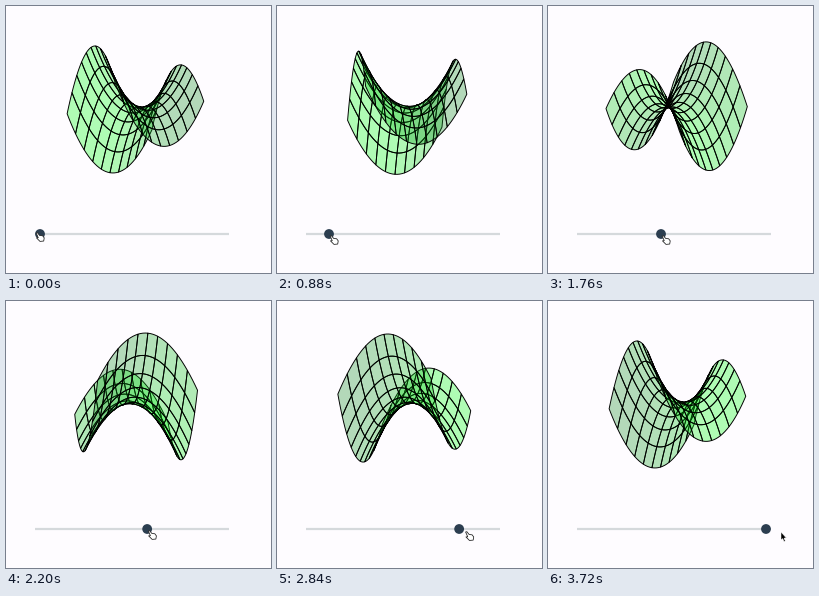
A matplotlib script that plays this animation: 265x267 px, repeating every 3760 ms.

```python
import numpy as np
import matplotlib.pyplot as plt
from matplotlib.animation import FuncAnimation
from matplotlib.collections import PolyCollection
from matplotlib.patches import Circle, Polygon

W, H, DPI = 265, 267, 100
FRAMES, STEP = 94, 40
PX = 72 / DPI

# Saddle z = K (x^2 - y^2) on [-1, 1]^2, seen from slightly below
CX, CY, SCALE = 128.5, 101.6, 50
ELEV = np.radians(20)
K = 1.095
CELLS = 10
PERSPECTIVE = 0.04
START_DEG, SWEEP_DEG = 30, 180

# The knob is dragged from X0 to X1; the hand drifts ahead of it
X0, X1, TRACK_Y = 34, 218, 228
DRAG = {600: X0, 880: 52, 1760: 113, 3400: X1}
RELEASE = 3520

HAND = 0.88 * np.array([(-4.4, -4.6), (-3, -5), (-0.4, -1.8), (3, -1.4),
                        (4.8, 1), (4.2, 4.6), (0, 5), (-4, 1), (-2, 0.8)])
ARROW = np.array([(0, -5), (0, 3), (1.7, 1.6), (3, 4.6), (4.3, 4),
                  (3, 1.1), (5.4, 1)])


def cell_borders():
    """Outlines of all grid cells, each side sampled so that it bends."""
    s = np.linspace(0, 1, 5)[:-1]
    zero, one = np.zeros(4), np.ones(4)
    u = np.concatenate([s, one, 1 - s, zero])
    v = np.concatenate([zero, s, one, 1 - s])
    i, j = np.divmod(np.arange(CELLS ** 2), CELLS)
    return 2 * (i[:, None] + u) / CELLS - 1, 2 * (j[:, None] + v) / CELLS - 1


def shade(x, y):
    """Translucent green, lit from a direction fixed to the surface."""
    x, y = x.mean(axis=1), y.mean(axis=1)
    n = np.stack([-2 * K * x, 2 * K * y, np.ones_like(x)], axis=1)
    n /= np.linalg.norm(n, axis=1, keepdims=True)
    light = n @ np.array([2, 2, 1]) / 3
    t = np.clip((light + 0.85) / 1.75, 0, 1)[:, None]
    dark = np.array([0.05, 0.52, 0.12, 0.31])
    bright = np.array([0, 1, 0.05, 0.31])
    return dark + (bright - dark) * t


GX, GY = cell_borders()
GZ = K * (GX ** 2 - GY ** 2)
COLORS = shade(GX, GY)


def project(angle):
    """Screen outlines of the cells and their order from far to near."""
    right = GX * np.cos(angle) - GY * np.sin(angle)
    back = GX * np.sin(angle) + GY * np.cos(angle)
    down = back * np.sin(ELEV) - GZ * np.cos(ELEV)
    depth = back * np.cos(ELEV) + GZ * np.sin(ELEV)
    zoom = SCALE / (1 + PERSPECTIVE * depth)
    verts = np.stack([CX + zoom * right, CY + zoom * down], axis=2)
    return verts, np.argsort(-depth.mean(axis=1))


def ramp(t, start, end):
    return np.clip((t - start) / (end - start), 0, 1)


fig = plt.figure(figsize=(W / DPI, H / DPI), dpi=DPI, facecolor="#fefcff")
ax = fig.add_axes([0, 0, 1, 1])
ax.set_xlim(0, W)
ax.set_ylim(H, 0)
ax.axis("off")

surface = PolyCollection([], edgecolors="black", linewidths=0.95 * PX,
                         joinstyle="round")
ax.add_collection(surface, autolim=False)
ax.plot([29, 223], [TRACK_Y] * 2, color="#d5d9dc", lw=2.2 * PX,
        solid_capstyle="butt")
knob = ax.add_patch(Circle((X0, TRACK_Y), 4.9, fc="#2c3e50", ec="none",
                           zorder=4))
hand = ax.add_patch(Polygon(HAND, fc="white", ec="#222222", lw=0.8 * PX,
                            joinstyle="round", zorder=5))
arrow = ax.add_patch(Polygon(ARROW, fc="black", ec="white", lw=0.5 * PX,
                             zorder=5))


def draw(frame):
    t = frame * STEP
    pos = np.interp(t, list(DRAG), list(DRAG.values()))
    turn = (pos - X0) / (X1 - X0)
    verts, order = project(np.radians(START_DEG - SWEEP_DEG * turn))
    surface.set_verts(verts[order])
    surface.set_facecolor(COLORS[order])

    knob.center = pos, TRACK_Y
    grab, drift = ramp(t, 500, 880), ramp(t, 2200, 3400)
    tip = np.array([pos + 5 * grab + 10 * drift,
                    TRACK_Y + 3 + 3 * grab + 2 * drift])
    hand.set_xy(HAND + tip)
    arrow.set_xy(ARROW + tip)
    hand.set_visible(t < RELEASE)
    arrow.set_visible(t >= RELEASE)
    return surface, knob, hand, arrow


anim = FuncAnimation(fig, draw, frames=FRAMES, interval=STEP, repeat=True,
                     repeat_delay=0)
plt.show()
```
